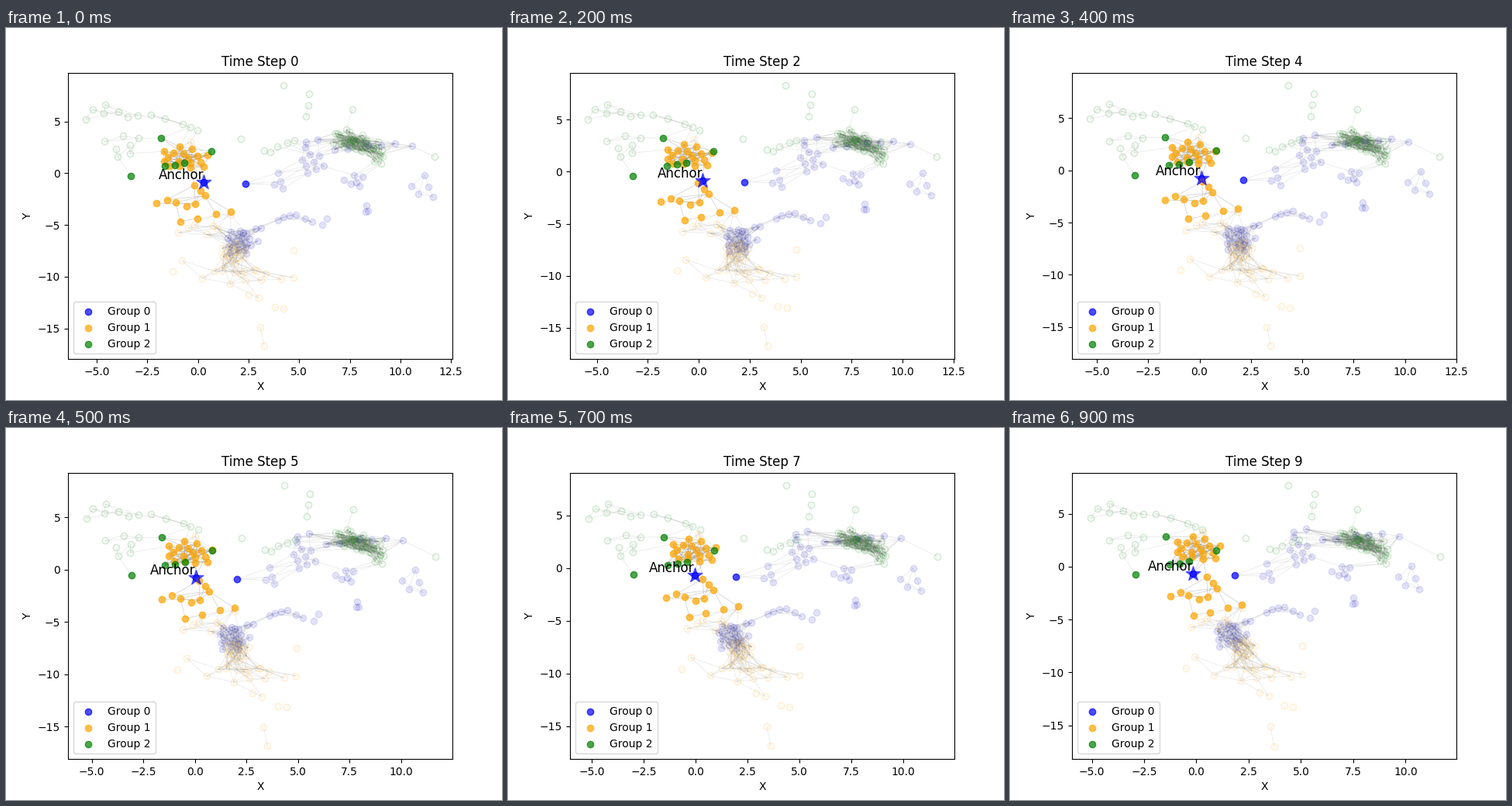
Write a matplotlib script that moves like this. It is 640 px wide and 480 px high and loops after 1 s.

```python
import numpy as np
import matplotlib.pyplot as plt
from matplotlib.animation import FuncAnimation
from matplotlib.collections import LineCollection
from matplotlib.colors import to_rgba

STEPS = 10
COLORS = ["blue", "orange", "green"]
GOLDEN_ANGLE = np.pi * (3 - np.sqrt(5))
rng = np.random.default_rng(4)

# Axis limits (left, right, bottom, top) at the first and last step.
VIEW_START = np.array([-6.417, 12.567, -17.96, 9.71])
VIEW_END = np.array([-5.945, 12.430, -18.193, 8.887])

# Drift over the whole run, per group: (constant, x factor, y factor).
DRIFT_X = [(-0.42, -0.045, 0), (0.66, -0.065, 0), (0.31, -0.031, 0)]
DRIFT_Y = [(0.24, 0, 0.014), (0.2, 0, 0.03), (-0.48, -0.008, -0.032)]


def cloud(center, radii, count):
    """Evenly filled ellipse, slightly shaken."""
    i = np.arange(count)
    radius, angle = np.sqrt((i + 0.5) / count), i * GOLDEN_ANGLE
    unit = np.column_stack([radius * np.cos(angle), radius * np.sin(angle)])
    return center + unit * radii + rng.normal(size=(count, 2))


def trail(start, end, spread, count):
    """Points strung from start to end, scattered around the line."""
    shake = np.clip(rng.normal(size=(count, 2)), -2, 2)
    return np.linspace(start, end, count) + shake * spread


# Starting places in stage pixels; the first near blue point is the anchor.
near = [
    np.array([(255, 199), (309, 201)]),
    np.vstack([
        cloud((229, 168), (36, 16), 17),
        trail((194, 223), (245, 229), (1, 3), 5),
        trail((226, 251), (290, 236), (1, 2), 4),
        trail((244, 203), (258, 215), 1, 3),
    ]),
    np.vstack([
        [(200, 142), (161, 191), (265, 159)],
        trail((205, 178), (229, 174), 1, 3),
    ]),
]
far = [
    np.vstack([
        cloud((540, 205), (17, 20), 5),
        cloud((466, 235), (3, 4), 3),
        trail((416, 246), (348, 247), (2, 4), 8),
        cloud((350, 197), (11, 13), 4),
        cloud((393, 172), (17, 20), 9),
        cloud((448, 197), (14, 12), 6),
        trail((385, 152), (524, 150), (3, 4), 8),
        cloud((303, 277), (22, 15), 15),
        trail((290, 263), (330, 258), (2, 2), 5),
    ]),
    np.vstack([
        [(238, 147), (371, 287)],
        trail((226, 262), (285, 252), (3, 7), 7),
        cloud((292, 291), (16, 14), 14),
        trail((257, 317), (332, 312), (4, 5), 10),
        trail((283, 330), (372, 320), (3, 3), 5),
        trail((312, 345), (355, 366), (3, 4), 4),
        trail((328, 386), (333, 410), 0, 2),
        trail((215, 314), (227, 300), 0, 2),
    ]),
    np.vstack([
        [(103, 118), (128, 99), (303, 143), (358, 74), (447, 105), (553, 166)],
        trail((110, 108), (204, 115), (2, 3), 7),
        cloud((150, 150), (28, 18), 7),
        trail((228, 124), (247, 132), 0, 3),
        trail((389, 85), (389, 114), (2, 0), 3),
        trail((332, 160), (371, 146), (2, 2), 5),
        trail((426, 137), (486, 166), (6, 7), 45),
    ]),
]


def to_data(pixels):
    left, right, bottom, top = VIEW_START
    x = left + (pixels[:, 0] - 80) / 496 * (right - left)
    y = top - (pixels[:, 1] - 57.6) / 369.6 * (top - bottom)
    return np.column_stack([x, y])


def drift(points, group):
    terms = np.column_stack([np.ones(len(points)), points])
    return terms @ np.array([DRIFT_X[group], DRIFT_Y[group]]).T


def dot_style(group, is_near):
    color = COLORS[group]
    if is_near:
        return dict(color=color, alpha=0.7, label=f"Group {group}")
    if group == 0:
        return dict(color="mediumblue", alpha=0.11, linewidths=1)
    return dict(facecolors=[to_rgba(color, 0.04)],
                edgecolors=[to_rgba(color, 0.16)], linewidths=1)


starts = [to_data(pixels) for pixels in near + far]
moves = [drift(start, i % 3) for i, start in enumerate(starts)]
start_all, move_all = np.vstack(starts), np.vstack(moves)
near_count = sum(map(len, near))

# Link a random share of the neighbouring pairs.
a, b = np.triu_indices(len(start_all), 1)
gap = np.linalg.norm(start_all[a] - start_all[b], axis=1)
linked = (gap < 2) & (rng.random(len(gap)) < 0.4)
a, b = a[linked], b[linked]
link_alpha = np.where(b < near_count, 0.4, 0.2)

fig, ax = plt.subplots(figsize=(6.4, 4.8), dpi=100)
dots = [ax.scatter(*start.T, **dot_style(i % 3, i < 3))
        for i, start in enumerate(starts)]
star = ax.scatter(*start_all[0], s=200, marker="*", color="blue", alpha=0.6)
links = LineCollection([], colors=[to_rgba("gray", alpha) for alpha in link_alpha],
                       linewidths=0.5, zorder=0.5)
ax.add_collection(links, autolim=False)
name = ax.text(0, 0, "Anchor", fontsize=12, ha="right", va="bottom")
title = ax.set_title("")
ax.set_xlabel("X")
ax.set_ylabel("Y")
ax.legend(loc="lower left")


def update(step):
    t = step / (STEPS - 1)
    for dot, start, move in zip(dots, starts, moves):
        dot.set_offsets(start + t * move)
    points = start_all + t * move_all
    links.set_segments(np.stack([points[a], points[b]], axis=1))
    star.set_offsets(points[0])
    name.set_position(points[0])
    title.set_text(f"Time Step {step}")
    left, right, bottom, top = VIEW_START + t * (VIEW_END - VIEW_START)
    ax.set_xlim(left, right)
    ax.set_ylim(bottom, top)
    return [*dots, links, star, name, title]


animation = FuncAnimation(fig, update, frames=STEPS, interval=100, repeat=True)
plt.show()
```
